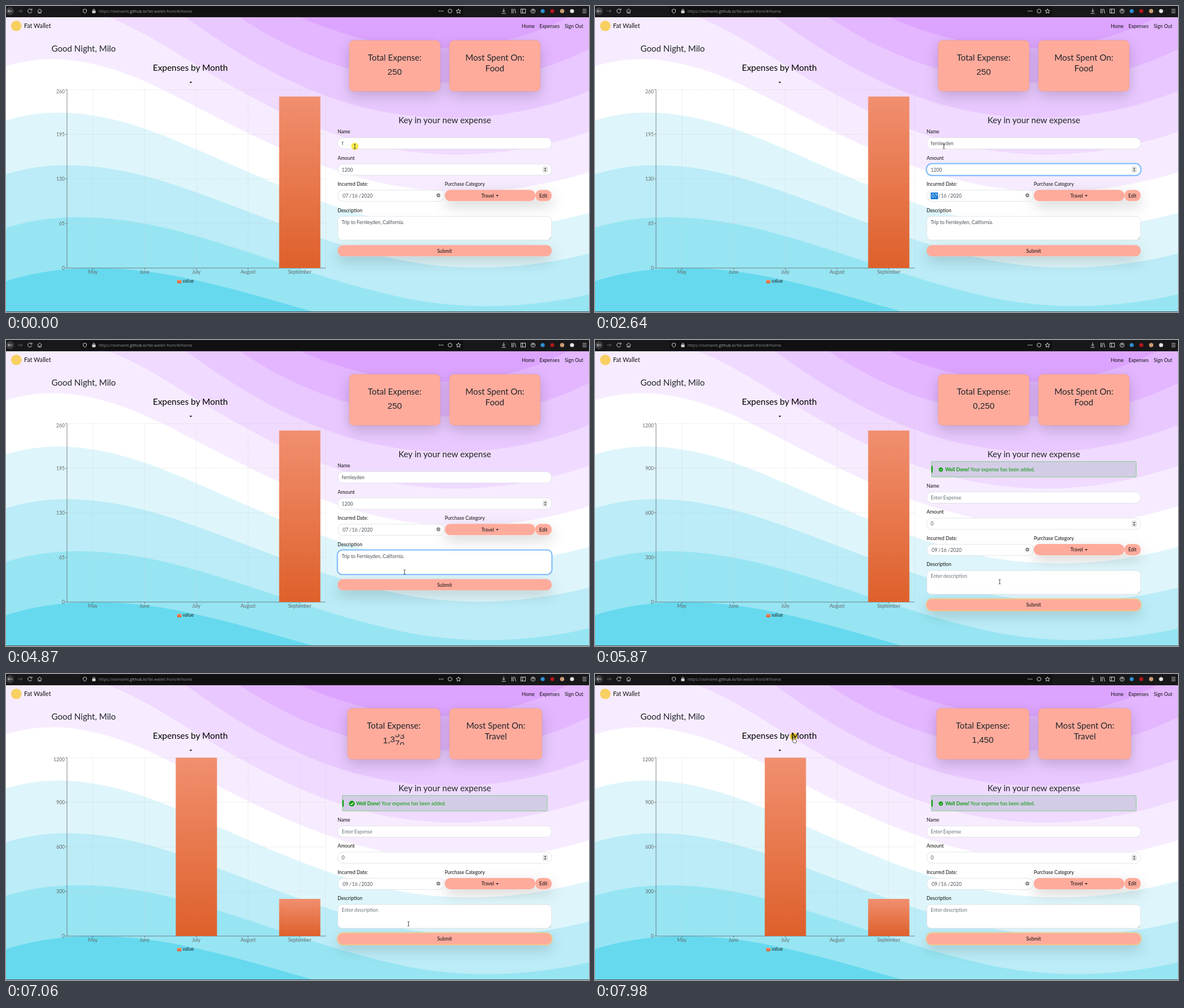
Recreate the animation shown at these times as an HTML page. Size 1032x543 px, loop 8000 ms.

```html
<!DOCTYPE html>
<html lang="en">
<head>
<meta charset="utf-8">
<title>Fat Wallet</title>
<style>
html, body { margin: 0; width: 100%; height: 100%; overflow: hidden; background: #fff; }
svg { display: block; }
text { font: 8.6px Lato, sans-serif; fill: #111; white-space: pre; }
.h { font-size: 15.1px; fill: #212529; }
.mid { text-anchor: middle; }
.end { text-anchor: end; }
.axis text, .axis { fill: #666; }
.field { fill: #fff; stroke: #ced4da; stroke-width: .6; }
.value { fill: #495057; }
.button { fill: #ffab9c; }
.card { fill: #ffab9c; stroke: rgba(0,0,0,.13); stroke-width: .6; }
.blue { fill: none; stroke: #80bdff; stroke-width: 2.1; }
.gold { fill: none; stroke: #f3c58a; stroke-width: 1.8; }
.odo { font: 15.3px "Liberation Sans", Arial, sans-serif; fill: #212529; }
.url { font: 7.1px "Open Sans", sans-serif; fill: #8d8d90; }
.icons { fill: none; stroke: #d4d4d6; stroke-width: 1; }
.green { fill: #0a9c0a; }
</style>
</head>
<body>
<svg id="stage" width="100%" height="100%" viewBox="0 0 1032 543">
  <defs>
    <linearGradient id="orange" x1="0" y1="0" x2="0" y2="1">
      <stop offset="0" stop-color="#f18f6f"/><stop offset="1" stop-color="#de602b"/>
    </linearGradient>
    <filter id="shadow" filterUnits="userSpaceOnUse" x="520" y="0" width="512" height="543">
      <feDropShadow dx="0" dy="8.6" stdDeviation="12" flood-opacity=".175"/>
    </filter>
    <clipPath id="reel"><rect x="650" y="107" width="75" height="18.7"/></clipPath>
  </defs>

  <svg y="20" width="1032" height="523" viewBox="0 0 1600 800" preserveAspectRatio="xMidYMid slice">
    <rect width="1600" height="800" fill="#66d9ee"/>
    <path fill="#97e5f3" d="M0 719.8c49-16.8 99.5-27.8 150.7-33.5c111.9-12.7 226-2.4 335.3 19.4l10.2 2c116.8 24 231.7 59 347.6 92.2H1600V0H0z"/>
    <path fill="#bbecf7" d="M0 574.9c52.3-17.6 106.5-27.7 161.1-30.9C268.4 537.4 375.7 554.2 478.4 581l9.5 2.5c196.2 52.5 388.7 133.5 593.5 176.6c174.2 36.6 349.5 29.2 518.6-10.2V0H0z"/>
    <path fill="#def6fb" d="M0 429.4c55.6-18.4 113.5-27.3 171.4-27.7c102.8-.8 203.2 22.7 299.3 54.5l8.9 3c183.6 62 365.7 146.1 562.4 192.1c186.7 43.7 376.3 34.4 557.9-12.6V0H0z"/>
    <path fill="#fff" d="M0 283.2C59 263.6 120.6 255.7 181.8 259.4c98.2 6 191.9 35.2 281.3 72.1l8.3 3.4c171 71.6 342.7 158.5 531.3 207.7c198.8 51.8 403.4 40.8 597.3-14.8V0H0z"/>
    <path fill="#f7ecff" d="M0 136.3c62.3-20.9 127.7-27.5 192.2-19.2c93.6 12.1 180.5 47.7 263.3 89.6l7.7 3.9c158.4 81.1 319.7 170.9 500.3 223.2c210.5 61 430.8 49 636.6-16.6V0H0z"/>
    <path fill="#f0daff" d="M288.1 0c56 21.3 108.7 50.6 159.7 82l7.1 4.3C600.7 177 751.6 269.3 924.1 325c208.6 67.4 431.3 60.8 637.9-5.3l38-12.9V0z"/>
    <path fill="#e9c8ff" d="M498 0c118.1 85.8 243.5 164.5 386.8 216.2c191.8 69.2 400 74.7 595 21.1c40.8-11.2 81.1-25.2 120.3-41.7V0z"/>
    <path fill="#e3b6ff" d="M643.4 0c62.9 41.7 129.7 78.2 202.1 107.4C1020.4 178.1 1214.2 196.1 1397.5 154.8c47.2-10.6 93.6-25.3 138.6-43.8L1600 81.5V0z"/>
    <path fill="#dda4ff" d="M809.1 0C966.8 71 1144.7 101 1315.3 72.4c75.3-12.6 148.9-37.1 216.8-72.4z"/>
  </svg>
  <rect y="542" width="1032" height="1" fill="#4a4f52"/>

  <rect width="1032" height="20" fill="#18181a"/>
  <rect x="132" y="1" width="677" height="17" rx="1.5" fill="#101011"/>
  <circle cx="7" cy="9" r="7" fill="#3a3a3d"/>
  <g class="icons">
    <path d="M11 9H3.5M6.5 6l-3 3l3 3"/>
    <path stroke="#66666a" d="M21 9h7.5M25.5 6l3 3l-3 3"/>
    <path d="M45 6.5a3.6 3.6 0 1 0 .7 3.4M46 4.8v2.5h-2.7"/>
    <path d="M55.5 9l4-4l4 4M57 8.5v4h5v-4M59.500 12.500v-2.500"/>
    <path d="M139.500 5.500l3 1v2.500q0 2.500-3 4q-3-1.500-3-4V6.500zM154 8.500V7a1.500 1.500 0 0 1 3 0v1.500"/>
    <rect x="153" y="8.700" width="5" height="3.500" fill="#d4d4d6"/>
    <path stroke-width="1.500" stroke-dasharray="1.600 1.400" d="M766.500 9h8"/>
    <circle cx="786" cy="9" r="3.400"/>
    <path d="M801 5l1.200 2.700l2.900.3l-2.200 1.900l.700 2.900l-2.600-1.500l-2.600 1.500l.700-2.900l-2.200-1.900l2.900-.3z"/>
    <path d="M881 4.500v6M878.500 8l2.500 2.500l2.500-2.500M877.500 13h7M895.500 5v8M898 5v8M900.300 5l2.200 8"/>
    <rect x="911.500" y="5.500" width="8" height="7"/><path d="M914.500 5.500v7"/>
    <circle cx="933" cy="9" r="3.700"/><circle cx="933" cy="8" r="1.200"/>
    <path d="M1020.500 6h7M1020.500 9h7M1020.500 12h7"/>
  </g>
  <circle cx="950" cy="9" r="3.600" fill="#2f8fd0"/>
  <circle cx="967" cy="9" r="3.600" fill="#b3161b"/>
  <circle cx="984.500" cy="9" r="3.800" fill="#c99c74"/>
  <circle cx="1002" cy="9" r="3.600" fill="#e4e4e4"/>
  <text class="url" x="164" y="11.600">https://ovimaret.<tspan fill="#a9a9ac">github.io</tspan>/fat-wallet-front/#/home</text>

  <circle cx="18.200" cy="35.300" r="9.300" fill="#f8d062"/>
  <text x="32" y="39.300" style="font-size:10.750px">Fat Wallet</text>
  <text x="913" y="39">Home</text>
  <text x="944.500" y="39">Expenses</text>
  <text x="989" y="39">Sign Out</text>
  <text class="h" x="80.500" y="81">Good Night, Milo</text>
  <text class="h mid" x="326.300" y="114.600" style="font-size:15.400px;fill:#000">Expenses by Month</text>
  <path d="M324.700 134.500h4.800l-2.400 2.400z"/>

  <g id="chart" class="axis"></g>
  <rect id="july" x="300.500" width="73" fill="url(#orange)"/>
  <rect id="sept" x="483.500" width="73" fill="url(#orange)"/>
  <rect x="303" y="486" width="7.500" height="6" fill="url(#orange)"/>
  <text x="312.500" y="491.300" style="fill:#222">value</text>

  <g filter="url(#shadow)">
    <rect id="cardA" class="card" y="60.800" height="90.700" rx="8"/>
    <rect id="cardB" class="card" x="784.700" y="60.800" height="90.700" rx="8"/>
  </g>
  <text id="total" class="h mid" y="97">Total Expense:</text>
  <text id="plain" class="odo mid" x="688" y="121.500">250</text>
  <g id="odo" clip-path="url(#reel)"></g>
  <text id="most" class="h mid" y="97">Most Spent On:</text>
  <text id="top" class="h mid" y="115.600"></text>
  <text class="h mid" x="776.700" y="207.700">Key in your new expense</text>

  <g id="alert">
    <rect x="595.500" y="215.700" width="362.500" height="27.300" rx="1.500" fill="#d4cce6" stroke="#80cd8c"/>
    <rect x="595.500" y="223.500" width="2.200" height="12" rx="1" fill="#0a9c0a"/>
    <g id="tick">
      <circle r="3.700" class="green"/>
      <path d="M-1.800 .1l1.300 1.300l2.400-2.500" fill="none" stroke="#fff" stroke-width="1"/>
    </g>
    <text class="green" x="620" y="233"><tspan font-weight="700">Well Done!</tspan> Your expense has been added.</text>
  </g>

  <g id="form">
    <text x="587" y="226">Name</text>
    <text x="587" y="272.500">Amount</text>
    <text x="587" y="319">Incurred Date:</text>
    <text x="776.700" y="319">Purchase Category</text>
    <text x="587" y="365.500">Description</text>
    <rect class="field" x="587.300" y="233.700" width="378.500" height="20" rx="9.500"/>
    <rect class="field" x="587.300" y="280.200" width="378.500" height="20" rx="9.500"/>
    <rect class="field" x="587.300" y="326.700" width="189" height="20" rx="9.500"/>
    <rect class="field" x="587.300" y="373.200" width="378.500" height="42.300" rx="8"/>
    <g filter="url(#shadow)">
      <rect class="button" x="776.700" y="326.200" width="160.300" height="20" rx="9.500"/>
      <rect class="button" x="937" y="326.200" width="29" height="20" rx="9.500"/>
      <rect class="button" x="587" y="424.200" width="379" height="20" rx="9.500"/>
    </g>
    <g id="rings"></g>
    <text id="name" x="594.300" y="247"></text>
    <text id="amount" class="value" x="594.300" y="293.600"></text>
    <rect x="950.800" y="285.500" width="7.400" height="9.600" rx="1" fill="#e4e4e4" stroke="#bbb" stroke-width=".5"/>
    <path d="M952.700 289.200h3.600l-1.800-2.200zM952.700 291.400h3.600l-1.800 2.200z" fill="#333"/>
    <rect id="pick" y="331" height="11.800" fill="#0b74d1"/>
    <g id="date"></g>
    <circle cx="765.400" cy="336" r="3.400" fill="#808388"/>
    <path d="M764 334.600l2.800 2.800m0-2.800l-2.800 2.800" stroke="#fff" stroke-width=".8"/>
    <text x="841.600" y="339.500">Travel</text>
    <path d="M867.200 335.500h4.800l-2.400 2.500z" fill="#111"/>
    <text class="mid" x="951.300" y="339.500">Edit</text>
    <text id="note" x="594.300" y="386.600"></text>
    <path d="M960.500 414l4-4M962.800 414l1.700-1.700" stroke="#888" stroke-width=".5"/>
    <text class="mid" x="776.500" y="437.500">Submit</text>
    <rect id="caret" width=".7" height="10.500" fill="#222"/>
  </g>

  <circle id="glow" r="6.500" fill="#f5e31c" style="mix-blend-mode:multiply"/>
  <g id="cursor">
    <path d="M-1.800-3.800q1.800 0 1.800 1v6q0 1-1.800 1M1.800-3.800q-1.800 0-1.800 1M1.800 4.200q-1.800 0-1.800-1" fill="none" stroke="#222" stroke-width=".8"/>
    <path d="M0 0v9l2.100-2l1.500 3.300l1.400-.6l-1.500-3.200h2.800z" fill="#fff" stroke="#111" stroke-width=".6"/>
    <path d="M-.8.6q.8-1.200 1.600 0v4l3.200.7q1.300.4 1.200 1.800l-.7 4h-4.500l-2.600-4q-.4-1.300.8-1l1 .9z" fill="#fff" stroke="#111" stroke-width=".7"/>
  </g>
</svg>
<script>
const NS = 'http://www.w3.org/2000/svg';
const $ = id => document.getElementById(id);
const LOOP = 8000, BASE = 465, PLOT = 316.5, SHIFT = 35.8;
const SENT = 5780, LOADED = 5850, CHANGED = 5920;
const WORD = 'fernleyden';
const KEYS = [0, 550, 690, 830, 970, 1110, 1370, 1540, 1660, 1800];

function add(parent, tag, attrs, text) {
  const el = document.createElementNS(NS, tag);
  set(el, attrs);
  if (text !== undefined) el.textContent = text;
  parent.appendChild(el);
  return el;
}
function set(el, attrs) {
  for (const k in attrs) el.setAttribute(k, attrs[k]);
}
function write(el, text) {
  if (el.textContent !== text) el.textContent = text;
}
const show = (el, on) => { el.style.display = on ? '' : 'none'; };
const ramp = (t, a, b) => Math.min(1, Math.max(0, (t - a) / (b - a)));
const within = (t, a, b) => t >= a && t < b;

// CSS "ease": cubic-bezier(.25, .1, .25, 1)
function ease(x) {
  let lo = 0, hi = 1;
  const bez = (s, a, b) => 3 * s * (1 - s) * (1 - s) * a + 3 * s * s * (1 - s) * b + s * s * s;
  for (let i = 0; i < 22; i++) {
    const m = (lo + hi) / 2;
    if (bez(m, .25, .25) < x) lo = m; else hi = m;
  }
  return x <= 0 ? 0 : x >= 1 ? 1 : bez(lo, .1, 1);
}

// Chart frame
const chart = $('chart');
const scale = [];
const line = (x1, y1, x2, y2, dash) => add(chart, 'line', {
  x1, y1, x2, y2, stroke: dash ? '#ccc' : '#666', 'stroke-width': dash ? .6 : .8,
  'stroke-dasharray': dash ? '1.6 1.6' : 'none'
});
for (let i = 0; i < 5; i++) {
  const y = BASE - PLOT * i / 4, x = 153.8 + 91.55 * i;
  if (i) line(108, y, 566, y, true);
  line(x, 148.5, x, BASE, true);
  line(105, y, 108, y);
  line(x, BASE, x, BASE + 3);
  scale.push(add(chart, 'text', { class: 'end', x: 104, y: i < 4 ? y + 3.2 : 155.4 }));
  add(chart, 'text', { class: 'mid', x, y: 475.3 }, ['May', 'June', 'July', 'August', 'September'][i]);
}
line(566, 148.5, 566, BASE, true);
line(108, 148.5, 108, BASE);
line(108, BASE, 566, BASE);

// Focus rings: x, y, width, height, start, end
const rings = [
  [587, 233.5, 379, 20.4, 30, 2290],
  [587, 280, 379, 20.4, 2290, 2640],
  [587, 326.5, 189.500, 20.4, 2640, 3480],
  [776.7, 326.2, 160.300, 20, 3900, 4020, 'gold'],
  [937, 326.2, 29, 20, 4020, 4190, 'gold'],
  [587, 373, 379, 42.700, 4310, 5640],
  [587, 424.2, 379, 20, 5640, 9000, 'gold']
].map(([x, y, width, height, from, to, kind]) => ({
  from, to,
  el: add($('rings'), 'rect', {
    class: kind || 'blue', x: x - .5, y: y - .5, width: width + 1, height: height + 1, rx: height > 40 ? 8.5 : 10
  })
}));

const date = [596, 607.8, 612.3, 624.5, 629].map(x => add($('date'), 'text', { x, y: 340 }));

// Rolling total: every column steps through its own run of values
const columns = [0, 1, 2, 3].map(i => {
  const unit = 10 ** (3 - i), a = Math.floor(250 / unit), b = Math.floor(1450 / unit);
  const steps = Math.min(b - a, i === 3 ? 45 : 30);
  const digit = k => Math.round(a + (b - a) * Math.min(k, steps) / steps) % 10;
  const x = 8.51 * i + (i ? 4.25 : 0);
  const cell = () => add($('odo'), 'text', { class: 'odo' });
  return { steps, digit, x, cells: [cell(), cell()] };
});
const comma = add($('odo'), 'text', { class: 'odo', y: 121.5 }, ',');

function drawTotal(t, mid) {
  const part = ease((t - 5910) / 1750), left = mid - 19.1;
  for (const { steps, digit, x, cells } of columns) {
    const pos = part * steps, k = Math.floor(pos);
    cells.forEach((cell, j) => {
      write(cell, String(digit(k + j)));
      set(cell, { x: left + x, y: 121.5 + (k + j - pos) * 16.55 });
    });
    show(cells[1], part < 1);
  }
  comma.setAttribute('x', left + 8.51);
}

// Pointer path: time, x, y
const path = [
  [3930, 617.5, 249], [4140, 668, 365], [4480, 698, 402], [4870, 705.5, 411.5],
  [5090, 716, 428], [6190, 716.4, 429], [7060, 712.5, 443], [7270, 702, 441], [7880, 351.5, 111]
];
function pointer(t) {
  const i = path.findIndex(p => p[0] > t);
  if (i === 0) return path[0].slice(1);
  if (i < 0) return path[path.length - 1].slice(1);
  const [a, b] = [path[i - 1], path[i]];
  const u = ramp(t, a[0], b[0]), s = u * u * (3 - 2 * u);
  return [a[1] + (b[1] - a[1]) * s, a[2] + (b[2] - a[2]) * s];
}
const shapes = [...$('cursor').children];

function drawPointer(t) {
  const [x, y] = pointer(t);
  const hand = within(t, 5030, SENT) || t >= 7800;
  const arrow = within(t, 3990, 4300) || within(t, 7320, 7800);
  set($('cursor'), { transform: `translate(${x} ${y})` });
  shapes.forEach((el, i) => show(el, i === (hand ? 2 : arrow ? 1 : 0)));
  const glow = t < 5000 ? .8 * (1 - ramp(t, 0, 160))
    : t < 7000 ? ramp(t, 5620, 5650) * (1 - ramp(t, 5700, 5850)) : ramp(t, 7860, 7930);
  set($('glow'), { cx: x, cy: y, opacity: glow });
}

function drawForm(t) {
  const sent = t >= SENT;
  set($('form'), { transform: `translate(0 ${sent ? SHIFT : 0})` });
  const typed = WORD.slice(0, KEYS.filter(k => k <= t).length);
  const note = 'Trip to Fernleyden, California.';
  write($('name'), sent ? 'Enter Expense' : typed);
  write($('amount'), sent ? '0' : '1200');
  write($('note'), sent ? 'Enter description' : note);
  for (const id of ['name', 'note']) $(id).style.fill = sent ? '#6c757d' : '#495057';

  const pick = within(t, 2640, 3480) ? (t < 2920 ? 0 : t < 3150 ? 2 : 4) : -1;
  [sent ? '09' : '07', '/', '16', '/', '2020'].forEach((s, i) => {
    write(date[i], s);
    date[i].style.fill = i === pick ? '#fff' : '#495057';
  });
  show($('pick'), pick >= 0);
  if (pick >= 0) set($('pick'), { x: [594.3, 0, 611, 0, 628][pick], width: pick === 4 ? 23 : 12.8 });

  for (const r of rings)
    r.el.setAttribute('opacity', ramp(t, r.from, r.from + 120) * (1 - ramp(t, r.to, r.to + 120)));

  const inName = within(t, 60, 2130);
  const inNote = within(t, 4310, 4810) || within(t, 5310, 5640);
  show($('caret'), inName || inNote);
  if (inName || inNote) {
    const box = inName ? $('name') : $('note');
    set($('caret'), { x: 594.6 + box.getComputedTextLength(), y: inName ? 238.500 : 378.400 });
  }

  set($('alert'), { opacity: ramp(t, SENT, SENT + 60) });
  const pulse = 1 + .38 * Math.sin(Math.PI * ramp(t, 6800, 7300));
  set($('tick'), { transform: `translate(612.2 230) scale(${pulse})` });
}

function drawChart(t) {
  const step = t < LOADED ? 65 : 300;
  scale.forEach((el, i) => write(el, String(step * i)));
  const grow = ease((t - CHANGED) / 400);
  const bar = (id, h) => set($(id), { y: BASE - h, height: h });
  const old = PLOT * 250 / 260, now = PLOT * 250 / 1200;
  bar('july', PLOT * grow);
  bar('sept', old + (now - old) * grow);
}

function drawCards(t) {
  const wide = t >= CHANGED, extra = wide ? 3 : 0;
  set($('cardA'), { x: 607.3 - extra, width: 161.4 + extra });
  set($('cardB'), { width: 161.2 + extra });
  const a = wide ? 686.4 : 688, b = wide ? 867 : 865.3;
  $('total').setAttribute('x', a);
  $('most').setAttribute('x', b);
  $('top').setAttribute('x', b);
  write($('top'), wide ? 'Travel' : 'Food');
  show($('plain'), t < LOADED);
  show($('odo'), t >= LOADED);
  drawTotal(t, a);
}

const start = performance.now();
function draw() {
  const t = (performance.now() - start) % LOOP;
  drawChart(t);
  drawCards(t);
  drawForm(t);
  drawPointer(t);
  requestAnimationFrame(draw);
}
draw();
</script>
</body>
</html>
```
